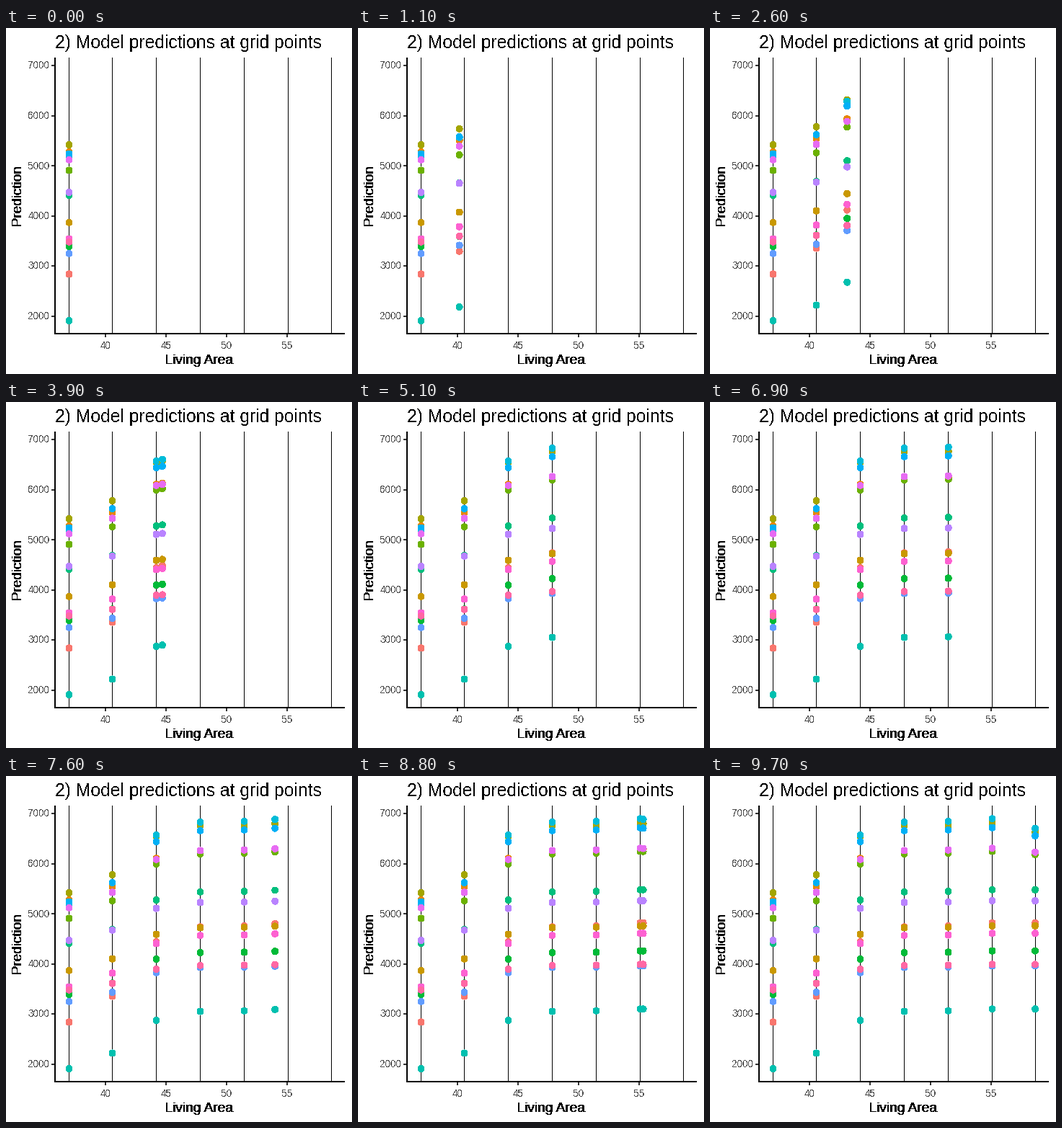
A matplotlib script that plays this animation: 480x480 px, repeating every 10000 ms.

```python
import matplotlib.pyplot as plt
import numpy as np
from matplotlib.animation import FuncAnimation

plt.rcParams["font.family"] = "Liberation Sans"
plt.rcParams["text.antialiased"] = False

SIZE, DPI, FRAMES, INTERVAL = 480, 72, 100, 100
HOLD, MOVE = 0.95, 14.5

# Predictions of each series at the first grid point and on the plateau.
START = np.array([2830, 5270, 3860, 5410, 4900, 3380, 4400, 1900,
                  5160, 5230, 3240, 4460, 5110, 3530, 3470])
PEAK = np.array([4810, 6290, 4750, 6800, 6240, 4250, 5470, 3090,
                 6890, 6710, 3950, 5250, 6300, 4600, 3980])
# Share of the rise reached at each grid point.
RISE = np.array([0, 0.26, 0.81, 0.96, 0.97, 1, 1])

STEPS = len(RISE) - 1
PERIOD = FRAMES / STEPS
GRID_X = np.floor(87.1 + 60.8 * np.arange(len(RISE))) + 0.5


def hue_color(degrees, chroma=100, light=65):
    """sRGB colour of a polar CIE-LUV hue."""
    h = np.radians(degrees)
    lum = ((light + 16) / 116) ** 3
    u = chroma * np.cos(h) / (13 * light) + 0.1978
    v = chroma * np.sin(h) / (13 * light) + 0.4683
    x = 9 * lum * u / (4 * v)
    z = 3 * lum / v - 5 * lum - x / 3
    to_rgb = np.array([[3.2405, -1.5371, -0.4985],
                       [-0.9693, 1.8760, 0.0416],
                       [0.0556, -0.2040, 1.0572]])
    rgb = np.clip(to_rgb @ [x, lum, z], 0, 1)
    return np.where(rgb > 0.00304, 1.055 * rgb ** (1 / 2.4) - 0.055, 12.92 * rgb)


def to_y(value):
    return 52 + (7000 - value) * 0.0695


def cubic_in_out(t):
    return 4 * t ** 3 if t < 0.5 else 1 - 4 * (1 - t) ** 3


COLORS = [hue_color(15 + 360 * i / len(START)) for i in range(len(START))]
values = START + np.outer(RISE, PEAK - START)
values[-1] -= 0.2 * np.clip(PEAK - 5900, 0, None)  # high curves dip at the end
curves = to_y(values) - 0.5

fig = plt.figure(figsize=(SIZE / DPI, SIZE / DPI), dpi=DPI, facecolor="white")
ax = fig.add_axes([0, 0, 1, 1])
ax.set(xlim=(0, SIZE), ylim=(SIZE, 0))
ax.axis("off")


def line(xs, ys, width, color="black", zorder=1):
    ax.plot(xs, ys, color=color, lw=width, antialiased=False,
            solid_capstyle="butt", zorder=zorder)


def label(x, y, text, size, **kw):
    kw = {"ha": "center", "va": "baseline", "color": "black", **kw}
    ax.text(x, y, text, fontsize=size, **kw)


def axis_title(x, y, text, dx=0, dy=0, **kw):
    # Struck twice for a heavier stem.
    label(x, y, text, 19.1, **kw)
    label(x + dx, y + dy, text, 19.1, **kw)


def dots(x, ys, zorder):
    return ax.scatter(np.full(len(ys), x), ys, s=9 ** 2, c=COLORS,
                      linewidths=0, antialiased=False, zorder=zorder)


for x in GRID_X - 0.5:
    line([x, x], [41, 424], 1)
line([68, 68], [41, 425], 2, zorder=4)
line([68, 470], [424, 424], 2, zorder=4)

for value in range(2000, 7001, 1000):
    y = to_y(value)
    line([63, 68], [y, y], 2, "#333333")
    label(60.5, y + 4.5, str(value), 13.5, ha="right", color="#4D4D4D")
for value in range(40, 56, 5):
    x = 138 + (value - 40) * 16.83
    line([x, x], [424, 429], 2, "#333333")
    label(x, 445, str(value), 13.5, color="#4D4D4D")

label(68, 28, "2) Model predictions at grid points", 24.75, ha="left")
axis_title(267.5, 466.5, "Living Area", dx=1)
axis_title(16, 231.5, "Prediction", dy=-1, rotation=90, va="center")

marks = [dots(x, ys, 2) for x, ys in zip(GRID_X, curves)]
mover = dots(GRID_X[0], curves[0], 3)


def update(frame):
    step = min(int(frame / PERIOD), STEPS - 1)
    e = cubic_in_out(np.clip((frame - step * PERIOD - HOLD) / MOVE, 0, 1))
    x = GRID_X[step] + (GRID_X[step + 1] - GRID_X[step]) * e
    ys = curves[step] + (curves[step + 1] - curves[step]) * e
    mover.set_offsets(np.column_stack([np.full(len(ys), x), ys]))
    for i, mark in enumerate(marks):
        mark.set_visible(i <= step)
    return [mover, *marks]


anim = FuncAnimation(fig, update, frames=FRAMES, interval=INTERVAL, repeat=True)
plt.show()
```
